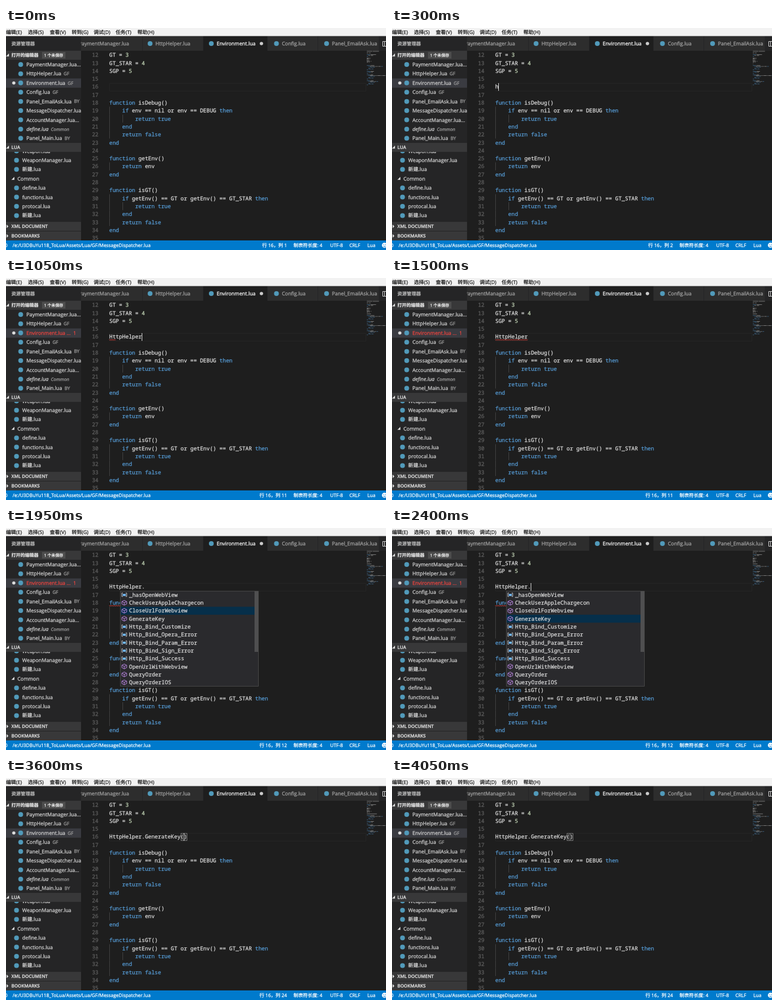
An HTML page with a canvas for the animation above (4.2 s loop, 633 px wide and 371 px high).

```html
<!DOCTYPE html>
<html lang="zh">
<head>
<meta charset="utf-8">
<style>
  html, body { margin: 0; width: 100%; height: 100%; overflow: hidden; background: #1e1e1e; }
  canvas { display: block; }
</style>
</head>
<body>
<canvas id="stage" width="633" height="371"></canvas>
<script>
const ctx = document.getElementById("stage").getContext("2d");
const LOOP = 4200, CHAR = 5.4, LINE = 13.3, ROW = 15.42, CODE_X = 172;
const UI = '"Open Sans", "Noto Sans CJK SC", "Noto Sans CJK", sans-serif';
const MONO = '"Noto Sans Mono", monospace';
const ICON = "#519aba", KEYWORD = "#569cd6", PLAIN = "#dcdcdc", LABEL = "#d4d4d4", ERROR = "#f0443f";
const KEYWORDS = /^(function|if|then|return|end|true|false)$/;

const code = `module("env", package.seeall)

env = nil

function setEnv(value)
    env = value
end

DEBUG = 0
TEST = 1
QA = 2
GT = 3
GT_STAR = 4
SGP = 5



function isDebug()
    if env == nil or env == DEBUG then
        return true
    end
    return false
end

function getEnv()
    return env
end

function isGT()
    if getEnv() == GT or getEnv() == GT_STAR then
        return true
    end
    return false
end

function isSGP()
    if getEnv() == SGP then
        return true
    end
    return false
end`.split("\n");

// A leading * marks a method.
const words = { x: 183, width: 231, items: ["HttpHelper", "HttpProcesser", "QzH5PayType", "*OnBulletHitFish"] };
const members = { x: 190, width: 231, scroll: true, items: [
  "_hasOpenWebView", "*CheckUserAppleChargecon", "*CloseUrlForWebview", "*GenerateKey",
  "Http_Bind_Customize", "Http_Bind_Opera_Error", "Http_Bind_Param_Error", "Http_Bind_Sign_Error",
  "Http_Bind_Success", "*OpenUrlWithWebview", "*QueryOrder", "*QueryOrderIOS"] };

// Each step changes part of the editor state; squiggle is [line, length].
const steps = [
  [0, { text: "", list: null, selected: 0, caret: false, error: false, squiggle: [16, 0] }],
  [150, { caret: true }],
  [300, { text: "h" }],
  [600, { list: words, error: true, squiggle: [16, 1] }],
  [750, { text: "ht", squiggle: [16, 2] }],
  [1050, { text: "HttpHelper", list: null }],
  [1350, { squiggle: [16, 10] }],
  [1500, { caret: false }],
  [1650, { text: "HttpHelper.", list: members, caret: true }],
  [1800, { selected: 1, squiggle: [18, 8] }],
  [1950, { selected: 2, caret: false }],
  [2100, { selected: 3 }],
  [2400, { caret: true }],
  [3000, { text: "HttpHelper.GenerateKey", list: null, squiggle: [16, 22] }],
  [3300, { text: "HttpHelper.GenerateKey()" }],
  [3600, { error: false, squiggle: [16, 0] }],
  [3900, { caret: false }],
];

const lineY = n => 45 + (n - 12) * LINE;
const caretColumn = text => text.replace(")", "").length;

function box(x, y, w, h, color) {
  ctx.fillStyle = color;
  ctx.fillRect(x, y, w, h);
}

function frame(x, y, w, h, color) {
  ctx.strokeStyle = color;
  ctx.lineWidth = 1;
  ctx.strokeRect(x + .5, y + .5, w - 1, h - 1);
}

function dot(x, y, r, color) {
  ctx.fillStyle = color;
  ctx.beginPath();
  ctx.arc(x, y, r, 0, 7);
  ctx.fill();
}

function path(points, color, fill) {
  ctx.beginPath();
  points.forEach(([x, y]) => ctx.lineTo(x, y));
  ctx.fillStyle = ctx.strokeStyle = color;
  fill ? ctx.fill() : ctx.stroke();
}

// Writes slightly thickened text centred on y and returns its width.
function write(str, x, y, color = LABEL, size = 8.45, { style = "", family = UI, align = "left" } = {}) {
  ctx.font = `${style} ${size}px ${family}`;
  ctx.textRendering = "geometricPrecision";
  ctx.textAlign = align;
  ctx.fillStyle = ctx.strokeStyle = color;
  ctx.lineWidth = .25;
  ctx.lineJoin = "round";
  ctx.fillText(str, x, y + size * .36);
  ctx.strokeText(str, x, y + size * .36);
  return ctx.measureText(str).width;
}

const mono = (str, x, y, color) => write(str, x, y, color, 9, { family: MONO });

function writeCode(str, y) {
  for (const { 0: token, index } of str.matchAll(/\w+|[^\w\s]+/g)) {
    const color = KEYWORDS.test(token) ? KEYWORD : /^\d/.test(token) ? "#c4d6b8" : PLAIN;
    mono(token, CODE_X + index * CHAR, y, color);
  }
}

function arrow(x, y, open) {
  path(open ? [[x + 5, y - 3], [x + 5, y + 2], [x, y + 2]] : [[x + 1, y - 3], [x + 4, y], [x + 1, y + 3]], "#ddd", true);
}

function header(label, y, open) {
  box(0, y - 7.5, 125, 15, "#383839");
  arrow(0, y, open);
  write(label, 9, y, "#e0e0e0", 7.5, { style: "600" });
}

function file(name, x, y, note = "", color = LABEL, style = "") {
  dot(x - 9.5, y, 4, ICON);
  const width = write(name, x, y, color, 8.45, { style });
  if (note.includes("...")) write(note, x + width, y, color);
  else write(note, x + width + 4, y, "#a0a0a0", 7.6, { style });
}

function drawSidebar(error) {
  ctx.save();
  ctx.beginPath();
  ctx.rect(0, 13, 125, 343);
  ctx.clip();
  box(0, 13, 125, 343, "#252526");
  write("资源管理器", 9, 26, "#c4c4c4", 7.8);

  const opened = [["PaymentManager.lua", "..."], ["HttpHelper.lua", "GF"], ["Environment.lua", "GF"],
    ["Config.lua", "GF"], ["Panel_EmailAsk.lua", "BY"], ["MessageDispatcher.lua", "..."],
    ["AccountManager.lua", "..."], ["define.lua", "Common"], ["Panel_Main.lua", "BY"]];
  opened.forEach(([name, note], i) => {
    const y = 61 + i * ROW, current = i === 2, failed = current && error;
    if (current) {
      box(0, y - 7.5, 125, ROW, "#3a3b41");
      dot(13, y, 2.7, "#ddd");
    }
    file(name, 34, y, failed ? " ...  1" : note, failed ? ERROR : LABEL, name === "define.lua" ? "italic" : "");
  });

  ["Weapon", "WeaponManager", "新建", "", "define", "functions", "protocal", "新建"].forEach((name, i) => {
    const y = 205.5 + i * ROW;
    if (name) return file(name + ".lua", 27, y);
    arrow(9, y, true);
    write("Common", 19, y);
  });

  header("打开的编辑器", 45.5, true);
  box(60, 40, 39, 11, "#4d4d4d");
  write("1 个未保存", 63.5, 45.5, "#fff", 6.6);
  header("LUA", 199.5, true);
  header("XML DOCUMENT", 331.5);
  header("BOOKMARKS", 347.5);
  ctx.restore();
}

function drawTabs() {
  box(125, 13, 508, 25, "#252526");
  const tabs = [["PaymentManager.lua", 121, 100, 227], ["HttpHelper.lua", 249, 228, 328],
    ["Environment.lua", 351, 329, 435], ["Config.lua", 459.5, 436, 519], ["Panel_EmailAsk.lua", 543, 520, 621]];
  ctx.save();
  ctx.beginPath();
  ctx.rect(125, 13, 508, 25);
  ctx.clip();
  tabs.forEach(([name, x, left, right], i) => {
    const active = i === 2;
    box(left, 13, right - left, 25, active ? "#1e1e1e" : "#2d2d2d");
    dot(x - 9, 26, 4, ICON);
    write(name, x, 26, active ? "#fff" : "#a4a4a4");
  });
  ctx.restore();
  dot(425.5, 26, 2.8, "#ccc");
  frame(627, 22, 8, 9, "#ccc");
  box(630, 22, 1, 9, "#ccc");
}

function drawMinimap(lines) {
  ctx.globalAlpha = .5;
  lines.forEach((str, i) => {
    for (const { 0: token, index } of str.matchAll(/\S+/g))
      box(601 + index * .7, 38.5 + i * 1.4, token.length * .7, .9, KEYWORDS.test(token) ? KEYWORD : PLAIN);
  });
  ctx.globalAlpha = 1;
}

function drawEditor({ text, caret, squiggle: [line, length] }) {
  box(125, 38, 508, 318, "#1e1e1e");
  const lines = code.with(15, text);
  frame(CODE_X, 92, 428, 14, "#252525");
  for (let n = 12; n <= 35; n++) {
    const str = lines[n - 1], indent = str.search(/\S/);
    write(n, 154, lineY(n), "#5f5f5f", 9, { family: MONO, align: "right" });
    for (let col = 0; col < indent; col += 4)
      box(Math.round(CODE_X + col * CHAR), lineY(n) - LINE / 2, 1, LINE, "#404040");
    writeCode(str, lineY(n));
  }
  const caretX = Math.round(CODE_X + caretColumn(text) * CHAR);
  if (text.endsWith(")")) {
    frame(caretX - 5, 92, 6, 13, "#777");
    frame(caretX, 92, 6, 13, "#777");
  }
  if (length) {
    ctx.lineWidth = .9;
    const points = Array.from({ length: Math.round(length * CHAR / 1.5) + 1 },
      (_, i) => [CODE_X + i * 1.5, lineY(line) + 4.4 + i % 2 * 1.6]);
    path(points, ERROR);
  }
  if (caret) box(caretX, 92, 1, 13, "#d0d0d0");
  drawMinimap(lines);
}

function drawSymbol(x, y, isMethod) {
  ctx.lineWidth = 1;
  if (isMethod) {
    path([[x, y - 4], [x + 4, y - 2], [x + 4, y + 2], [x, y + 4], [x - 4, y + 2], [x - 4, y - 2], [x, y - 4]], "#b180d7");
    path([[x - 4, y - 2], [x, y], [x + 4, y - 2]], "#b180d7");
    path([[x, y], [x, y + 4]], "#b180d7");
    return;
  }
  for (const side of [-1, 1])
    path([[x + side * 2.5, y - 3], [x + side * 4, y - 3], [x + side * 4, y + 3], [x + side * 2.5, y + 3]], "#c5c5c5");
  box(x - 2.5, y - 1.5, 5, 3.5, "#75beff");
}

function drawPopup({ list, selected, text }) {
  if (!list) return;
  const { x, width, items, scroll } = list, top = 105, height = items.length * LINE;
  const query = text.split(".").pop();
  box(x, top, width, height, "#2a2a2d");
  box(x, top + selected * LINE, width, LINE, "#062f4a");
  items.forEach((item, i) => {
    const y = top + (i + .5) * LINE, name = item.replace("*", "");
    drawSymbol(x + 7, y, item !== name);
    let matched = 0;
    [...name].forEach((char, k) => {
      const hit = !scroll && char.toLowerCase() === query[matched];
      if (hit) matched++;
      mono(char, x + 15 + k * CHAR, y, hit ? "#0097fb" : PLAIN);
    });
  });
  if (scroll) box(x + width - 7, top + 1, 6, 101, "#4f4f50");
  frame(x, top, width, Math.round(height), "#454545");
}

function drawBars(text) {
  box(0, 0, 633, 13.5, "#f2f2f2");
  ["编辑(E)", "选择(S)", "查看(V)", "转到(G)", "调试(D)", "任务(T)", "帮助(H)"].forEach((label, i) =>
    write(label, i * 36.5, 6.5, "#1a1a1a", 8.4));

  box(0, 355, 633, 16, "#007acc");
  const status = (str, x, align) => write(str, x, 363, "#fff", 7.9, { align });
  status("0", -2);
  status("/e:/U3DBuYu118_ToLua/Assets/Lua/GF/MessageDispatcher.lua", 11);
  status(`行 16，列 ${caretColumn(text) + 1}`, 468, "right");
  status("制表符长度: 4", 479);
  status("UTF-8", 540);
  status("CRLF", 572);
  status("Lua", 602);
  dot(630.5, 363, 4.3, "#fff");
  dot(629, 362, .7, "#007acc");
  dot(632, 362, .7, "#007acc");
  box(628.5, 364.5, 4, 1, "#007acc");
}

function draw() {
  const time = performance.now() % LOOP;
  const state = Object.assign({}, ...steps.filter(([at]) => at <= time).map(([, change]) => change));
  drawEditor(state);
  drawTabs();
  drawSidebar(state.error);
  drawPopup(state);
  drawBars(state.text);
  requestAnimationFrame(draw);
}
draw();
</script>
</body>
</html>
```
